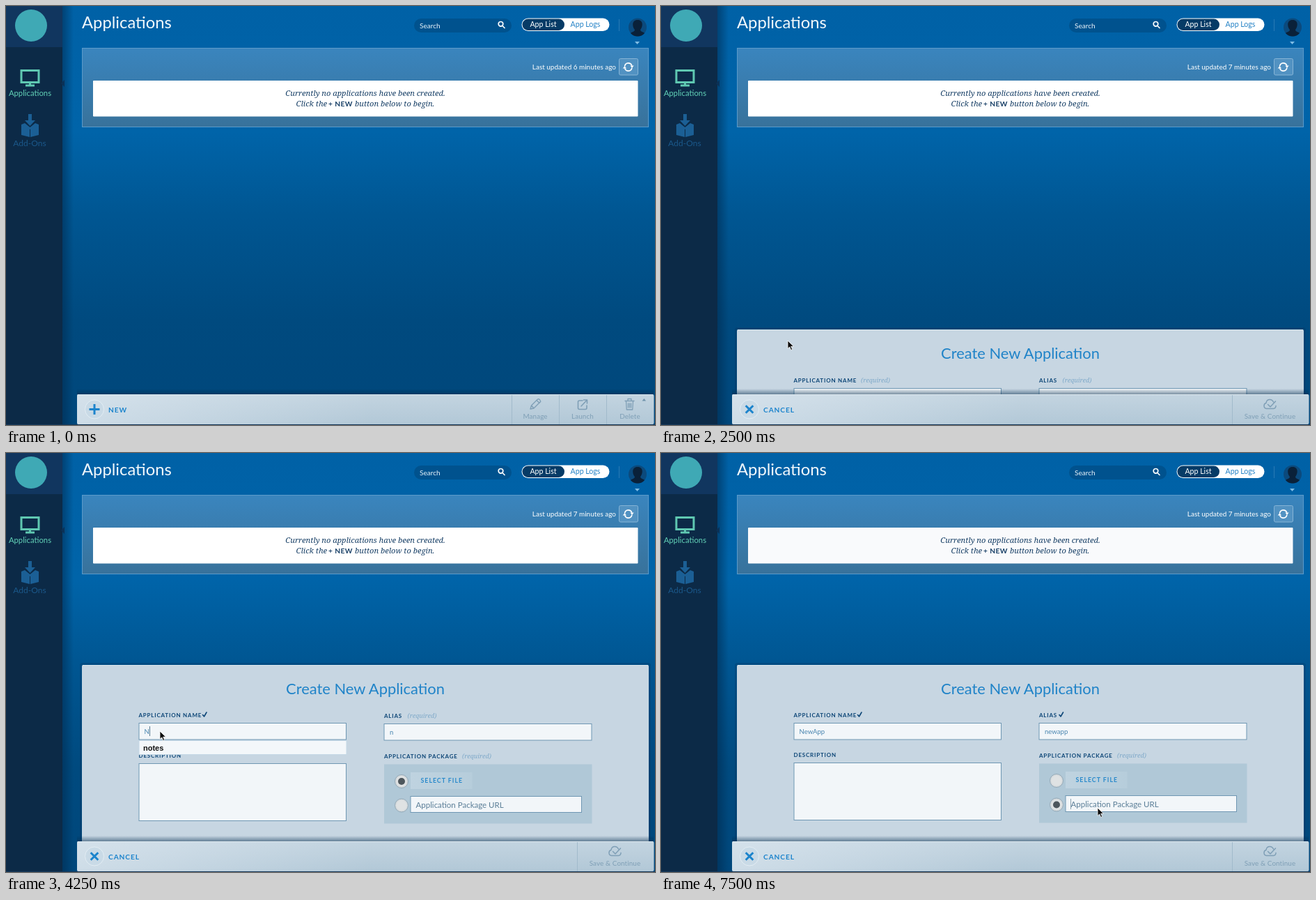
Write an HTML page that moves like this. It is 932 px wide and 601 px high and loops after 8 s.

```html
<!DOCTYPE html>
<html lang="en">
<head>
<meta charset="utf-8">
<title>Create application</title>
<style>
  html, body { margin: 0; width: 100%; height: 100%; overflow: hidden; background: #005a9a; }
  svg { display: block; width: 100vw; height: 100vh; }
  text { font-family: Lato, "Open Sans", sans-serif; white-space: pre; }
  .serif { font-family: "Noto Serif", Georgia, serif; font-style: italic; }
  .cap { font-weight: 700; font-size: 8px; letter-spacing: .8px; fill: #0d4677; }
  .btn { font-weight: 700; font-size: 10.2px; letter-spacing: .9px; fill: #1c84cc; }
  .req { font-size: 9.1px; fill: #7fa9c9; }
  .tool { font-size: 9.9px; fill: #7f9fb6; letter-spacing: .1px; }
  .val { font-size: 9.6px; fill: #4a86b0; }
  .mid { text-anchor: middle; }
  .field { fill: #f2f6f9; stroke: #6f97b3; }
  .line { fill: none; stroke-linecap: round; stroke-linejoin: round; }
</style>
</head>
<body>
<svg viewBox="0 0 932 601" preserveAspectRatio="none">
  <defs>
    <linearGradient id="sky" x2="0" y2="1">
      <stop offset="0" stop-color="#0061a6"/>
      <stop offset=".3" stop-color="#0064a9"/>
      <stop offset=".5" stop-color="#005692"/>
      <stop offset=".75" stop-color="#004a7f"/>
      <stop offset="1" stop-color="#00477b"/>
    </linearGradient>
    <linearGradient id="panel" x2="0" y2="1">
      <stop offset="0" stop-color="#3a85be"/>
      <stop offset="1" stop-color="#38729b"/>
    </linearGradient>
    <linearGradient id="edge">
      <stop offset="0" stop-color="#00294d" stop-opacity=".55"/>
      <stop offset="1" stop-color="#00294d" stop-opacity="0"/>
    </linearGradient>
    <linearGradient id="rise" x2="0" y2="1">
      <stop offset="0" stop-color="#002a4c" stop-opacity="0"/>
      <stop offset="1" stop-color="#002a4c" stop-opacity=".5"/>
    </linearGradient>
    <linearGradient id="bar" x2="0" y2="1">
      <stop offset="0" stop-color="#c3d4e0"/>
      <stop offset="1" stop-color="#b2c8d7"/>
    </linearGradient>
    <linearGradient id="glow">
      <stop offset="0" stop-color="#e0eaf2" stop-opacity=".6"/>
      <stop offset="1" stop-color="#e0eaf2" stop-opacity="0"/>
    </linearGradient>
    <linearGradient id="select">
      <stop offset="0" stop-color="#bfd3e0"/>
      <stop offset="1" stop-color="#b6cddb"/>
    </linearGradient>
    <g id="radio">
      <circle r="9.5" fill="#d5dadd" stroke="#93a9b7"/>
      <circle r="7.5" fill="#dfe2e3"/>
    </g>
  </defs>

  <rect width="932" height="601" fill="url(#sky)"/>

  <!-- sidebar -->
  <rect x="81" width="16" height="601" fill="url(#edge)"/>
  <rect width="81" height="601" fill="#0c2a47"/>
  <rect width="81" height="59" fill="#11365f"/>
  <circle cx="36" cy="28" r="23" fill="#3fa9b5"/>
  <path d="M84 106l-5 5 5 5z" fill="#0a3157"/>
  <g fill="none" stroke="#5fc8b1" stroke-width="3">
    <rect x="22" y="92.500" width="25" height="17"/>
    <path d="M34.500 110v4M28 114h13"/>
  </g>
  <text class="mid" x="34.500" y="129" font-size="11.3" fill="#62d0b6">Applications</text>
  <path d="M32 155h5v9h5l-7.500 8-7.500-8h5zM22 170l5-2 7.500 6 7.500-6 5 2v15l-12 3v-11l-.5-.5-.5.5v11l-12-3z" fill="#1b5f95"/>
  <text class="mid" x="34" y="201" font-size="12" fill="#1b588a">Add-Ons</text>

  <!-- header -->
  <text x="109" y="32" font-size="23.8" fill="#f2f8fc">Applications</text>
  <rect x="586" y="18" width="140" height="20" rx="10" fill="#00528e"/>
  <text x="594" y="32" font-size="10.1" fill="#eaf3fa">Search</text>
  <g class="line" stroke="#fff" stroke-width="1.7">
    <circle cx="710.500" cy="25.800" r="3.300"/>
    <path d="M713 28.500l3 3"/>
  </g>
  <rect x="740.500" y="17.500" width="126" height="18.500" rx="9.2" fill="#fff"/>
  <rect x="741.500" y="18.500" width="60.500" height="16.500" rx="8.2" fill="#063b66"/>
  <text class="mid" x="771.500" y="30" font-size="10.6" fill="#fff">App List</text>
  <text class="mid" x="832" y="30" font-size="10.6" fill="#2482c6">App Logs</text>
  <path d="M880.500 19v17" stroke="#2b7ab4"/>
  <circle cx="907" cy="30.500" r="13" fill="#0b4a7d"/>
  <path d="M907 20c9 0 7.500 10 4 14 0 3 4 3 6 5-5 6-15 6-20 0 2-2 6-2 6-5-3.500-4-5-14 4-14z" fill="#0a2139"/>
  <path d="M903 51h7l-3.500 4z" fill="#7fbce4"/>

  <!-- application list -->
  <rect x="109.500" y="60.500" width="813" height="113" fill="url(#panel)" stroke="#5b9aca"/>
  <text id="updated" x="876" y="90.500" font-size="9.95" text-anchor="end" fill="#fff"></text>
  <rect x="880.500" y="75.500" width="27" height="23.500" rx="2" fill="#5292c2" stroke="#86b4d6"/>
  <g class="line" stroke="#fff" stroke-width="1.600">
    <path d="M888.600 86a5.300 5.300 0 0 1 10-1M898.800 89a5.300 5.300 0 0 1-10 1"/>
  </g>
  <path d="M896.300 85.500h5.400l-2.700 3.300zM885.700 89.500h5.400l-2.700-3.300z" fill="#fff"/>
  <rect id="card" x="125" y="107" width="782.500" height="51.500" rx="1"/>
  <g font-size="11.1" fill="#173f66">
    <text class="serif mid" x="516" y="129">Currently no applications have been created.</text>
    <text class="serif" x="416.500" y="143.500">Click the</text>
    <text x="463" y="143.500" font-size="10.2" font-weight="700" letter-spacing=".4">+ NEW</text>
    <text class="serif" x="501" y="143.500">button below to begin.</text>
  </g>

  <!-- form: y is relative to its top edge -->
  <g id="form">
    <rect x="106" y="-3" width="820" height="300" rx="4" fill="#002f55" opacity=".25"/>
    <rect x="109" width="814" height="300" rx="2" fill="#c7d6e2"/>
    <path d="M110 .5h812" stroke="#dbe6ee"/>
    <text class="mid" x="516" y="41.500" font-size="21.9" fill="#1f83c8">Create New Application</text>
    <g id="nameRow">
      <text class="cap" x="190.500" y="74.500">APPLICATION NAME</text>
      <text id="nameReq" class="serif req" x="287" y="74.500">(required)</text>
      <rect class="field" x="191" y="83.500" width="297.500" height="23.500"/>
      <text id="nameVal" class="val" x="198.500" y="98.500"></text>
      <path id="nameCaret" d="M0 88v14" stroke="#56788f"/>
    </g>
    <path id="nameTick" class="line" d="M282.500 71.500l2 2.500 3.500-6" stroke="#0d4677" stroke-width="1.600"/>
    <g id="aliasRow">
      <text class="cap" x="543" y="74.500">ALIAS</text>
      <text id="aliasReq" class="serif req" x="576.500" y="74.500">(required)</text>
      <path id="aliasTick" class="line" d="M572 71.500l2 2.500 3.500-6" stroke="#0d4677" stroke-width="1.600"/>
      <rect class="field" x="543" y="83.500" width="298" height="23.500"/>
      <text id="aliasVal" class="val" x="551" y="98.500"></text>
    </g>
    <g id="lower">
      <text class="cap" x="190.500" y="132">DESCRIPTION</text>
      <rect class="field" x="191" y="140.500" width="297.500" height="82"/>
      <text class="cap" x="543" y="133">APPLICATION PACKAGE</text>
      <text class="serif req" x="655" y="133">(required)</text>
      <rect x="543" y="141.500" width="298.500" height="85" fill="#b0c8d7"/>
      <use href="#radio" x="568" y="166"/>
      <use href="#radio" x="568" y="200.500"/>
      <circle id="dot" cx="568" r="5" fill="#4d565c"/>
      <rect x="581" y="153" width="88.500" height="24" fill="url(#select)"/>
      <text x="595.500" y="168" font-size="8.8" font-weight="700" letter-spacing="1" fill="#2a8acb">SELECT FILE</text>
      <rect class="field" x="581" y="187.500" width="245.500" height="23"/>
      <text x="588.500" y="203.500" font-size="11.5" fill="#5c7f98">Application Package URL</text>
      <path id="urlCaret" d="M588.500 192v15" stroke="#8aa0b0"/>
    </g>
    <g id="suggest">
      <rect x="191" y="108.500" width="298" height="20" fill="#f3f7fa" stroke="#c4d8e6"/>
      <text x="197" y="123" font-size="11" font-weight="700" fill="#111" style="font-family:'Liberation Sans',Arial,sans-serif">notes</text>
    </g>
  </g>

  <!-- bottom bar -->
  <rect x="102" y="549" width="828" height="8" fill="url(#rise)"/>
  <rect x="102" y="557" width="828.500" height="43" rx="2" fill="url(#bar)"/>
  <rect x="102" y="557" width="420" height="43" rx="2" fill="url(#glow)"/>
  <path d="M103 557.500h826" stroke="#dce7ee"/>
  <path d="M0 600.500h932" stroke="#16385a"/>
  <circle id="ring" cx="127" cy="578.500" r="13.500" fill="#c9dae6"/>
  <path id="sign" d="M119.500 578.500h15M127 571v15" stroke="#1c84cc" stroke-width="3"/>
  <text id="action" class="btn" x="147" y="582.500"></text>
  <g id="listTools">
    <path d="M726.500 558v42M794.500 558v42M862.500 558v42" stroke="#a1bacb"/>
    <g class="line" stroke="#7f9fb6" stroke-width="1.300">
      <path d="M753 578l1.500-5 9-9q2-1 3.500 1.500t0 2.500l-9 9zM754.500 573l3.500 4M762 565.500l4 4"/>
      <path d="M828 566h-4.500q-2 0-2 2v8.500q0 2 2 2h8.500q2 0 2-2V573M826 574l8-8.500M829.500 565h5v5" stroke-width="1.600"/>
      <path d="M889 566.500h13M893 566v-2.500h5v2.500M890.500 567l.8 12h8.400l.8-12M893.500 570v6M895.500 570v6M897.500 570v6"/>
    </g>
    <path d="M913.500 566.500h5.500l-2.700-3.500z" fill="#6f92aa"/>
    <text class="tool mid" x="760" y="592">Manage</text>
    <text class="tool mid" x="828" y="592">Launch</text>
    <text class="tool mid" x="896" y="592">Delete</text>
  </g>
  <g id="formTools">
    <path d="M820.500 558v42" stroke="#a1bacb"/>
    <path class="line" d="M879.500 568q-2-4-6-3.500t-4.500 5q-3 .5-3 4t3.500 4h10q3.500-.5 3.500-4M871.500 571.500l3.500 3.500 7.500-8" stroke="#7f9fb6" stroke-width="1.500"/>
    <text class="tool mid" x="874.500" y="592" font-size="10.2">Save &amp; Continue</text>
  </g>

  <path id="cursor" d="M0 0v11.500l2.700-2.500 2 4.500 2-.9-2-4.300h3.800z" fill="#0b0b0b" stroke="#fff" stroke-width=".8"/>
</svg>

<script>
const LOOP = 8000, STEP = 250;
const el = {};
document.querySelectorAll("[id]").forEach(n => el[n.id] = n);

// pointer path: time, x, y
const path = [
  [250, 290, 540], [500, 210, 548], [750, 150, 567], [1000, 125, 577], [1500, 121, 581],
  [2250, 121, 581], [2500, 182, 480], [2750, 196, 444], [3000, 209, 417], [3500, 221, 399],
  [6000, 221, 399], [6250, 262, 412], [6500, 390, 455], [6750, 520, 492],
  [7000, 590, 506], [7250, 620, 509], [7500, 627, 509]
];

function pointerAt(t) {
  const i = path.findIndex(p => p[0] > t);
  if (i < 0) return path[path.length - 1].slice(1);
  const a = path[i - 1], b = path[i], k = (t - a[0]) / (b[0] - a[0]);
  return [a[1] + (b[1] - a[1]) * k, a[2] + (b[2] - a[2]) * k];
}

const show = (node, on) => node.setAttribute("display", on ? "inline" : "none");
const move = (node, x, y) => node.setAttribute("transform", `translate(${x} ${y})`);

function draw(time) {
  const t = Math.floor(time % LOOP / STEP) * STEP;
  const open = t >= 2500;
  const typed = "NewApp".slice(0, Math.max(0, (t - 4000) / STEP));
  const named = typed.length > 0, aliased = typed.length > 1;
  const byUrl = t >= 7250;

  el.updated.textContent = `Last updated ${open ? 7 : 6} minutes ago`;
  el.card.setAttribute("fill", t >= 7500 ? "#f9fafc" : "#fff");

  show(el.form, open);
  move(el.form, 0, t < 2750 ? 464 : t < 3000 ? 306 : 304);
  move(el.nameRow, 0, named ? 0 : 1);
  move(el.aliasRow, 0, aliased ? 0 : 1);
  move(el.lower, 0, aliased ? 0 : 1);
  show(el.nameReq, !named);
  show(el.nameTick, named);
  show(el.aliasReq, !aliased);
  show(el.aliasTick, aliased);
  el.nameVal.textContent = typed;
  el.aliasVal.textContent = typed.toLowerCase();
  show(el.suggest, typed.length === 1);

  show(el.nameCaret, t >= 4000 && t < 6000);
  move(el.nameCaret, Math.round(199 + el.nameVal.getComputedTextLength()) + .5, 0);
  show(el.urlCaret, t >= 7500);
  el.dot.setAttribute("cy", byUrl ? 200.5 : 166);

  el.action.textContent = open ? "CANCEL" : "NEW";
  el.sign.setAttribute("transform", open ? "rotate(45 127 578.5)" : "");
  el.ring.setAttribute("stroke", t >= 1500 && !open ? "#5fa5d6" : "#e3edf4");
  show(el.listTools, !open);
  show(el.formTools, open);

  show(el.cursor, t >= 250);
  if (t >= 250) move(el.cursor, ...pointerAt(t));
}

const start = performance.now();
function tick(now) {
  draw(Math.max(0, now - start));
  requestAnimationFrame(tick);
}
draw(0);
requestAnimationFrame(tick);
</script>
</body>
</html>
```
